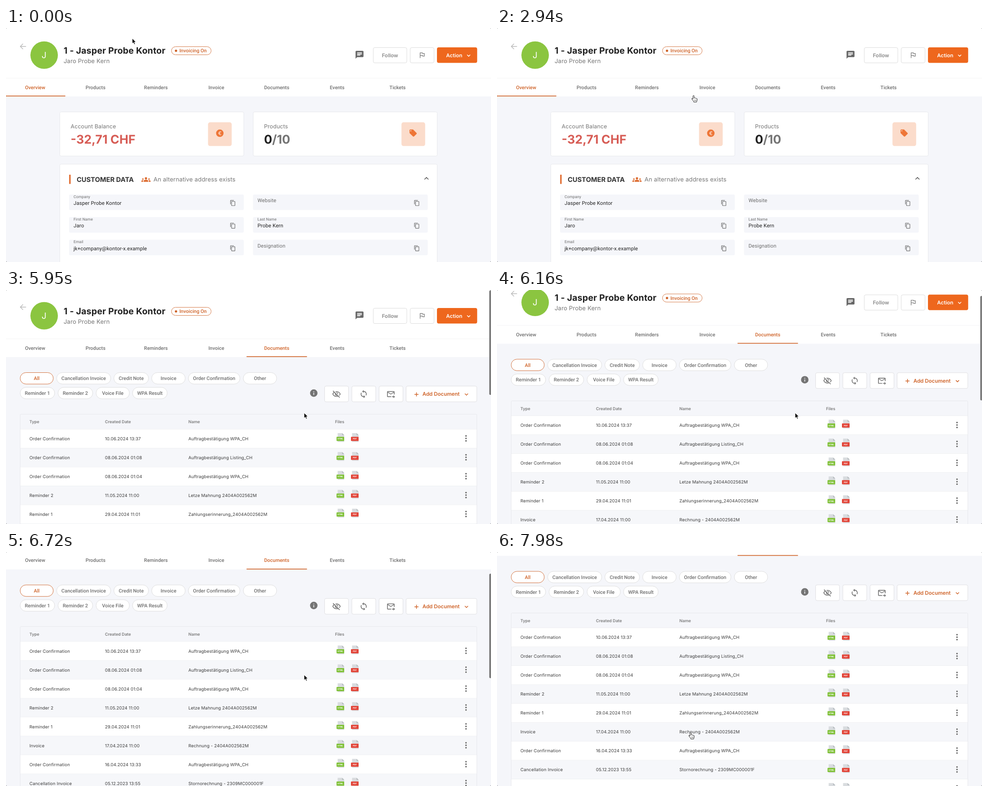
Recreate the animation shown at these times as an HTML page. Size 1077 by 520 pixels, loop 8000 ms.

```html
<!DOCTYPE html>
<html lang="en">
<head>
<meta charset="utf-8">
<title>Customer documents</title>
<style>
html, body { margin: 0; width: 100%; height: 100%; overflow: hidden; background: #8a8a8a; }
svg { display: block; width: 1077px; height: 520px; border-radius: 3px; background: #f5f6fa; }
text { font-family: Inter, sans-serif; font-optical-sizing: none; text-rendering: geometricPrecision; fill: #757575; white-space: pre; }
.mid { text-anchor: middle; }
.title { font-size: 19.6px; font-weight: 700; letter-spacing: .0075em; fill: #212121; }
.sub { font-size: 13.15px; letter-spacing: .0094em; }
.tab, .chip { font: 500 10.95px Roboto, sans-serif; fill: #6f6f6f; }
.btn { font-size: 11.5px; font-weight: 600; }
.card { font-size: 12.4px; letter-spacing: .01em; }
.big { font-size: 26.8px; font-weight: 700; fill: #212121; }
.head { font-size: 14.7px; font-weight: 700; fill: #333; }
.value, .empty { font: 11.4px Roboto, sans-serif; letter-spacing: .012em; fill: #212121; }
.empty { fill: #6b6b6b; }
.label { font: 8.6px Roboto, sans-serif; letter-spacing: .01em; fill: #6b6b6b; }
.th { font-size: 9.1px; font-weight: 600; fill: #7c7c7c; }
.td { font-size: 9.7px; letter-spacing: .0107em; fill: #3c3c3c; }
.ext { font-size: 4.3px; font-weight: 700; fill: #fff; }
text.on { fill: #cf642a; }
text.red { fill: #d75d56; }
text.white { fill: #fff; }
</style>
</head>
<body>
<svg id="stage" viewBox="0 0 1077 520" xmlns="http://www.w3.org/2000/svg"></svg>
<script>
const ORANGE = '#cf642a', LINE = '#e7e8ec', PALE = '#f5f6fa';

const text = (x, y, s, cls) => `<text x="${x}" y="${y}" class="${cls}">${s}</text>`;
const box = (x, y, w, h, r, fill, stroke = 'none') =>
  `<rect x="${x}" y="${y}" width="${w}" height="${h}" rx="${r}" fill="${fill}" stroke="${stroke}"/>`;
const dot = (x, y, r, fill) => `<circle cx="${x}" cy="${y}" r="${r}" fill="${fill}"/>`;
const line = (d, color, w = 1.5) => `<path d="${d}" fill="none" stroke="${color}" stroke-width="${w}"/>`;
const icon = (name, x, y, k, fill) =>
  `<path transform="translate(${x} ${y}) scale(${k})" fill="${fill}" d="${ICONS[name]}"/>`;

const ICONS = {
  chat: 'M20 2H4c-1.1 0-2 .9-2 2v18l4-4h14c1.1 0 2-.9 2-2V4c0-1.1-.9-2-2-2zM6 9h12v2H6V9zm8 5H6v-2h8v2zm4-6H6V6h12v2z',
  flag: 'M12.36 6l.4 2H18v6h-3.36l-.4-2H7V6h5.36M14 4H5v17h2v-7h5.6l.4 2h7V6h-5.6L14 4z',
  tag: 'M21.4 11.6l-9-9C12 2.2 11.5 2 11 2H4c-1.1 0-2 .9-2 2v7c0 .55.2 1 .6 1.4l9 9c.8.8 2 .8 2.8 0l7-7c.8-.8.8-2 0-2.8zM5.5 7a1.5 1.5 0 1 1 0-3 1.5 1.5 0 0 1 0 3z',
  people: 'M12 12.75c1.6 0 3 .4 4.2.9 1.1.5 1.8 1.5 1.8 2.7V18H6v-1.6c0-1.2.7-2.3 1.8-2.7 1.2-.6 2.6-.95 4.2-.95zM4 13a2 2 0 1 0 0-4 2 2 0 0 0 0 4zm1.1 1.1c-1.4-.2-2.7 0-3.9.5-.7.3-1.2 1-1.2 1.8V18h4.5v-1.6c0-.8.2-1.6.6-2.3zM20 13a2 2 0 1 0 0-4 2 2 0 0 0 0 4zm4 3.4c0-.8-.5-1.5-1.2-1.8-1.2-.5-2.5-.7-3.9-.5.4.7.6 1.5.6 2.3V18H24zM12 6a3 3 0 1 1 0 6 3 3 0 0 1 0-6z',
  copy: 'M16 1H4c-1.1 0-2 .9-2 2v14h2V3h12V1zm3 4H8c-1.1 0-2 .9-2 2v14c0 1.1.9 2 2 2h11c1.1 0 2-.9 2-2V7c0-1.1-.9-2-2-2zm0 16H8V7h11v14z',
  info: 'M12 2a10 10 0 1 0 0 20 10 10 0 0 0 0-20zm1 15h-2v-6h2v6zm0-8h-2V7h2v2z',
  hide: 'M12 6c3.8 0 7.2 2.1 8.8 5.5-.6 1.2-1.4 2.3-2.4 3.1l1.4 1.4c1.4-1.2 2.5-2.8 3.2-4.5C21.3 7.1 17 4 12 4c-1.3 0-2.5.2-3.6.6L10 6.2c.7-.1 1.3-.2 2-.2zm-1.1 1.1L13 9.2c.6.3 1 .7 1.3 1.3l2.1 2.1c.1-.4.1-.7.1-1.1A4.5 4.5 0 0 0 10.9 7.1zM2 3.9l2.7 2.7C3 7.8 1.8 9.5 1 11.5 2.7 15.9 7 19 12 19c1.5 0 3-.3 4.3-.8l3.4 3.4 1.4-1.4L3.4 2.4 2 3.9zm7.5 7.5L12.1 14A2.5 2.5 0 0 1 9.5 11.4zM6.1 8l1.8 1.7A4.5 4.5 0 0 0 13.8 15.6l1 1C10 17.9 5.3 15.7 3.2 11.5 3.9 10.1 4.9 8.9 6.1 8z',
  sync: 'M12 4V1L8 5l4 4V6a6 6 0 0 1 5.3 8.8l1.46 1.46A8 8 0 0 0 12 4zm0 14a6 6 0 0 1-5.3-8.8L5.24 7.74A8 8 0 0 0 12 20v3l4-4-4-4v3z',
  send: 'M20 4H4c-1.1 0-2 .9-2 2v12c0 1.1.9 2 2 2h9v-2H4V8l8 5 8-5v5h2V6c0-1.1-.9-2-2-2zm-8 7L4 6h16l-8 5zm7 4l4 4-4 4v-3h-4v-2h4v-3z'
};

const TABS = ['Overview', 'Products', 'Reminders', 'Invoice', 'Documents', 'Events', 'Tickets'];
const TAB_W = 134.15;

function header() {
  return box(-2, -2, 1081, 154, 0, '#fff') + box(0, 111, 1077, 1, 0, '#f3f3f5') +
    line('M44.5 41H32M37.8 35L31.8 41L37.8 47', '#b8b8b8', 1.4) +
    dot(84.7, 60.3, 30.5, '#8bc540') +
    `<text x="84.5" y="67" class="mid white" font-size="19">J</text>` +
    text(128, 57.2, '1 - Jasper Probe Kontor', 'title') +
    text(128, 78.2, 'Jaro Probe Kern', 'sub') +
    box(367.5, 41.5, 88, 18, 9, '#fff', '#d57a48') + dot(377.5, 50.5, 2.6, ORANGE) +
    text(385, 54.3, 'Invoicing On', 'chip on') +
    icon('chat', 774.5, 49, .88, '#666') +
    box(815.5, 43.5, 74.5, 34, 3.5, '#fff', '#dcdcdc') +
    `<g opacity=".85">${text(852.7, 64.6, 'Follow', 'btn mid')}</g>` +
    box(897.5, 43.5, 53, 34, 3.5, '#fff', '#dcdcdc') + icon('flag', 915.3, 51.7, .72, '#858585') +
    box(957, 43, 89.3, 34.4, 4, '#ee671d') + text(977.3, 64.6, 'Action', 'btn white') +
    line('M1024 59.5l3.4 3.4 3.4-3.4', '#fff') +
    TABS.map((s, i) => text(64.6 + TAB_W * i, 135.7, s, 'tab mid')).join('') +
    `<rect id="mark" y="150.3" width="${TAB_W}" height="1.7" fill="${ORANGE}"/>`;
}

function field(x, row, label, value) {
  const y = 370 + row * 50.3;
  return box(x, y, 388, 34.4, 3, PALE) + icon('copy', x + 356.8, y + 12, .58, '#6b6b6b') +
    (value ? text(x + 10, y + 7.6, label, 'label') + text(x + 10, y + 23, value, 'value')
           : text(x + 10, y + 17.3, label, 'empty'));
}

function overview() {
  const tile = x => box(x, 209.6, 52.6, 52.6, 4.5, '#fbdccb');
  const left = 140, right = 548.5;
  return box(119.5, 186.5, 408.5, 98, 3, '#fff', LINE) + box(549, 186.5, 408.5, 98, 3, '#fff', LINE) +
    text(143.5, 223.4, 'Account Balance', 'card') + text(143.5, 257, '-32,71 CHF', 'big red') +
    tile(448.6) + dot(474.8, 233.8, 8.3, '#ee7637') +
    `<text x="474.8" y="238" class="mid" font-size="11.5" font-weight="600" style="fill:#fbdccb">€</text>` +
    text(573, 223.4, 'Products', 'card') +
    text(573, 257, '0<tspan fill="#757575">/10</tspan>', 'big') +
    tile(878.2) + icon('tag', 894.5, 224, .8, '#ee7637') +
    box(119.5, 302.5, 838, 240, 3, '#fff', LINE) + box(140.3, 326, 3.2, 20.5, 0, '#e0682a') +
    text(157, 341.8, 'CUSTOMER DATA', 'head') + icon('people', 300.6, 326.4, .85, '#dc6a2e') +
    text(327.5, 341.2, 'An alternative address exists', 'sub') +
    line('M929.3 336.5l4.4-4.4 4.4 4.4', '#555') +
    field(left, 0, 'Company', 'Jasper Probe Kontor') + field(right, 0, 'Website') +
    field(left, 1, 'First Name', 'Jaro') + field(right, 1, 'Last Name', 'Probe Kern') +
    field(left, 2, 'Email', 'jk+company@kontor-x.example') + field(right, 2, 'Designation');
}

const chip = ([s, x, w], y) =>
  box(x, y, w, 25.5, 12.75, '#fff', s === 'All' ? '#d2703c' : '#dedede') +
  text(x + w / 2, y + 16.9, s, s === 'All' ? 'chip mid on' : 'chip mid');

function fileIcon(x, y, ext, color) {
  return `<path d="M${x + 2.5} ${y}h10l4.5 4.5v15h-14.5z" fill="#d9dcdf"/>` +
    `<path d="M${x + 12.5} ${y}l4.5 4.5h-4.5z" fill="#b4b9be"/>` +
    box(x, y + 8.2, 17, 9.3, 1, color) + text(x + 8.5, y + 14.4, ext, 'ext mid');
}

const ORDER = 'Order Confirmation', WPA = 'Auftragbestätigung WPA_CH';
const ROWS = [
  [ORDER, '10.06.2024 13:37', WPA],
  [ORDER, '08.06.2024 01:08', 'Auftragbestätigung Listing_CH'],
  [ORDER, '08.06.2024 01:04', WPA],
  ['Reminder 2', '11.05.2024 11:00', 'Letze Mahnung 2404A002562M'],
  ['Reminder 1', '29.04.2024 11:01', 'Zahlungserinnerung_2404A002562M'],
  ['Invoice', '17.04.2024 11:00', 'Rechnung - 2404A002562M'],
  [ORDER, '16.04.2024 13:33', WPA],
  ['Cancellation Invoice', '05.12.2023 13:55', 'Stornorechnung - 2309MC000001F'],
  [ORDER, '05.12.2023 13:50', WPA]
];
const COLS = [52, 219.8, 405, 730.7];

function row(cells, i) {
  const y = 312.5 + 42 * i;
  return box(32, y, 1013, 42, 0, i % 2 ? '#f6f7fa' : '#fff') + box(32, y + 41.5, 1013, 1, 0, LINE) +
    cells.map((s, c) => text(COLS[c], y + 24.4, s, 'td')).join('') +
    fileIcon(734, y + 8.5, 'HTML', '#80c138') + fileIcon(766, y + 8.5, 'PDF', '#e2463a') +
    [14.7, 20.2, 25.7].map(d => dot(1021.5, y + d, 1.75, '#6a6a6a')).join('');
}

function documents() {
  const top = [['All', 31.5, 73.5], ['Cancellation Invoice', 112.5, 120], ['Credit Note', 239.5, 77],
    ['Invoice', 323.5, 74.5], [ORDER, 405, 114.5], ['Other', 527, 74]];
  const low = [['Reminder 1', 31.5, 76.5], ['Reminder 2', 115.5, 77], ['Voice File', 200, 74], ['WPA Result', 281, 77]];
  const button = (x, w) => box(x, 216.5, w, 35, 3.5, '#fff', '#dfdfe2');
  return top.map(c => chip(c, 186.5)).join('') + low.map(c => chip(c, 219.3)).join('') +
    icon('info', 673.5, 222.2, .83, '#747474') +
    button(707.5, 53) + icon('hide', 724, 224.6, .83, '#747474') +
    button(768, 53) + icon('sync', 784.3, 224.3, .83, '#747474') +
    button(828.5, 53) + icon('send', 844.6, 224.4, .83, '#747474') +
    button(888.5, 157) + line('M907 235h9M911.5 230.5v9', ORANGE) +
    text(924.7, 238.3, 'Add Document', 'btn on') + line('M1019 233.3l3.5 3.5 3.5-3.5', ORANGE) +
    box(31.5, 279, 1014, 420, 2, PALE, LINE) + box(32, 312, 1013, 1, 0, LINE) +
    ['Type', 'Created Date', 'Name', 'Files'].map((s, i) => text(COLS[i], 299.3, s, 'th')).join('') +
    `<g id="rows">${ROWS.map(row).join('')}</g>`;
}

const stage = document.getElementById('stage');
stage.innerHTML =
  `<g id="page">${header()}<g id="overview">${overview()}</g><g id="documents">${documents()}</g></g>
  <rect id="bar" x="1073" width="7" height="232" rx="2.5" fill="#808080"/>
  <path id="arrow" d="M0 0V11.8L2.7 9.3L4.5 13.5L6.5 12.6L4.7 8.5H8.3Z" fill="#000" stroke="#fff" stroke-width=".9"/>
  <g id="hand" stroke="#1c1c1c" stroke-width="1" stroke-linejoin="round">
    <path d="M-1.3 8V1.3a1.3 1.3 0 0 1 2.6 0V5.5q1.7-.8 2.4.5q1.7-.7 2.3.6q1.9-.3 1.9 1.4v2.5q0 1.5-1.1 2.9V14.5H.3V13.2Q-.9 12-2.1 10L-3.8 8q-.8-1.6.9-1.6z" fill="#fff"/>
    <path d="M1.8 9.5v2.5M3.7 9.5v2.5M5.5 9.5v2.5" fill="none" stroke-width=".7"/>
  </g>`;

const $ = id => document.getElementById(id);
const show = (id, on) => $(id).setAttribute('display', on ? 'inline' : 'none');
const tabs = [...stage.querySelectorAll('.tab')];

const LOOP = 8000, STEP = 70;
const smooth = p => p * p * (3 - 2 * p);
const linear = p => p;

// Interpolates rows of [time, ...values].
function at(keys, t, ease) {
  const i = keys.findIndex(k => k[0] > t);
  if (i < 0) return keys[keys.length - 1].slice(1);
  if (i === 0) return keys[0].slice(1);
  const a = keys[i - 1], b = keys[i], p = ease((t - a[0]) / (b[0] - a[0]));
  return a.slice(1).map((v, n) => v + (b[n + 1] - v) * p);
}

const POINTER = [
  [490, 280.3, 23], [1050, 99.5, 139], [1540, 99.5, 139], [1610, 101.2, 139],
  [2380, 334, 135], [2590, 431.5, 150], [2870, 431.5, 150], [2940, 436.5, 150],
  [3710, 587, 140], [4900, 587, 140], [5460, 662, 273], [7210, 662, 273], [7980, 430, 401]
];
const SCROLL = [
  [5880, 0], [5950, 3], [6020, 11], [6090, 21.5], [6160, 32.7], [6300, 56], [6440, 78],
  [6580, 97], [6720, 113.3], [6860, 127], [7000, 138], [7140, 143.5]
];
const MARK = [[3850, 0], [4200, 4]];
const BAR = [[5880, 0], [5950, 1], [7210, 1], [7490, 0]];

function draw(time) {
  const t = Math.floor(time / STEP) * STEP;

  const [scroll] = at(SCROLL, t, linear);
  $('page').setAttribute('transform', `translate(0 ${-scroll})`);
  $('bar').setAttribute('y', Math.max(1, scroll * .434 - 1));
  $('bar').setAttribute('opacity', at(BAR, t, linear)[0]);

  const active = t < 3920 ? 0 : 4;
  tabs.forEach((el, i) => el.classList.toggle('on', i === active));
  $('mark').setAttribute('x', -2.4 + TAB_W * at(MARK, t, smooth)[0]);
  show('overview', t < 4060);
  show('documents', t >= 4060);
  show('rows', t >= 4270);

  const [x, y] = at(POINTER, t, smooth);
  const hand = t >= 7280 || (y > 112 && y < 153);
  show('hand', hand);
  show('arrow', !hand);
  $(hand ? 'hand' : 'arrow').setAttribute('transform', `translate(${x} ${y})`);
}

function tick() {
  draw(performance.now() % LOOP);
  requestAnimationFrame(tick);
}
tick();
</script>
</body>
</html>
```
